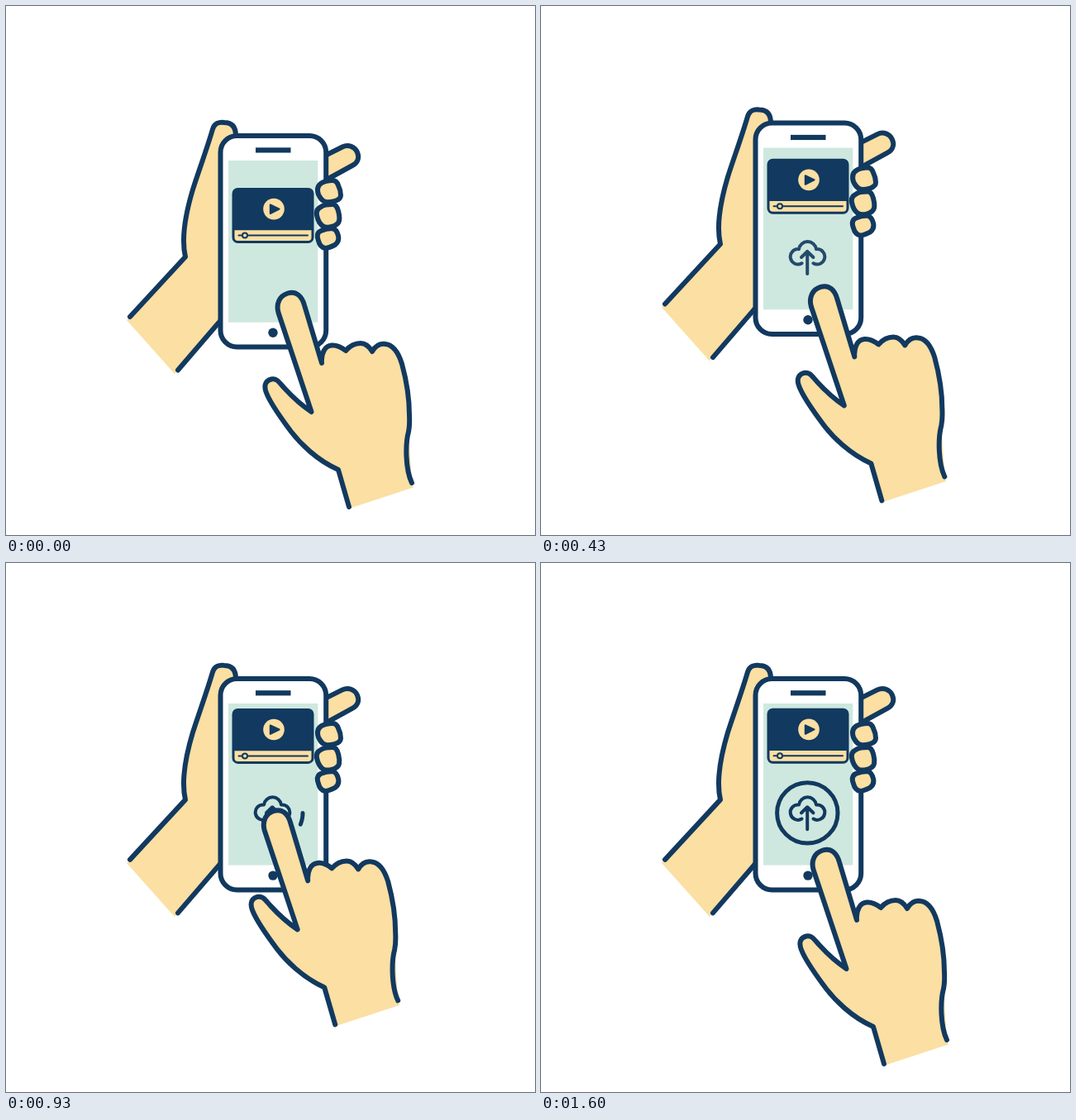
An HTML page that plays this animation: 640 by 640 pixels, repeating every 2400 ms.

```html
<!DOCTYPE html>
<html lang="en">
<head>
<meta charset="utf-8">
<title>Upload from phone</title>
<style>
  html, body { margin: 0; width: 100%; height: 100%; overflow: hidden; background: #fff; }
  svg { display: block; width: 100%; height: 100%; }
  .line { stroke: #12395f; stroke-width: 6; stroke-linecap: round; stroke-linejoin: round; }
  .skin { fill: #fbdfa3; }
  .navy { fill: #12395f; }
  .none { fill: none; }
</style>
</head>
<body>
<svg viewBox="0 0 640 640">
  <g id="phone">
    <path class="skin" d="M146 380 L150 376 L217 303.5 C212 282 217 252 226 222 C233 200 243 173 250 149 C252 142 258 140 264 141 C270 141 278 143 278 157 V380 H260 L208 440.5 L204 445 Z"/>
    <path class="line none" d="M150 376 L217 303.5 C212 282 217 252 226 222 C233 200 243 173 250 149 C252 142 258 140 264 141 C270 141 278 143 278 157 M208 440.5 L260 380"/>
    <path class="line skin" d="M388 180 L407 170.5 C414 167 422 170 425 177 C428 184 425 190 419 193 L388 210"/>
    <rect class="line" x="259.5" y="157" width="127.7" height="255.5" rx="20" fill="#fff"/>
    <rect class="navy" x="302" y="171.3" width="42.5" height="6.2"/>
    <rect x="269" y="187" width="108.3" height="195.7" fill="#cee8df"/>
    <circle class="navy" cx="323" cy="395.2" r="5.7"/>

    <g id="card">
      <rect class="line skin" x="275" y="221.5" width="96" height="64" rx="5.5" style="stroke-width:3"/>
      <path class="navy" d="M274 271.3 V227 Q274 221 280 221 H366 Q372 221 372 227 V271.3 Z"/>
      <circle class="skin" cx="324" cy="245.6" r="12.8"/>
      <path class="line navy" d="M319.8 240.5 L330.6 245.6 L319.8 251 Z" style="stroke-width:2"/>
      <path class="line none" d="M281.5 277.5 H365" style="stroke-width:2"/>
      <circle class="line skin" cx="289" cy="277.5" r="3" style="stroke-width:2"/>
    </g>

    <g id="cloud" class="line none" transform="translate(0 17.1)" style="stroke-width:4">
      <path d="M315.5 309.6 A9.2 9.2 0 1 1 312 292.5 A10.6 10.6 0 0 1 333 292.5 A9.2 9.2 0 1 1 329.5 309.6"/>
      <path d="M322.2 322.3 V296 M315 302.3 L322.2 295.3 L329.4 302.3"/>
    </g>
    <path id="ring" class="line none" transform="translate(0 17.1)" style="stroke-width:5"/>

    <g class="line skin">
      <path d="M382 214 C387 211 391 211 395 211 C399 211 401 214 402 217 C404 221 405 225 405 229 C405 233 401 235 398 236 C394 237 390 238 387 237 C382 236 380 232 378 228 C376 222 377 217 382 214 Z"/>
      <path d="M381 243 C385 240 391 240 395 240 C399 240 401 244 402 248 C403 252 404 255 403 260 C402 264 398 266 394 267 C390 268 386 268 383 266 C379 263 377 258 376 253 C375 248 377 245 381 243 Z"/>
      <path d="M381 272 C385 270 391 269 395 269 C399 270 401 274 402 278 C403 282 402 286 398 289 C394 291 390 293 386 293 C381 292 379 288 378 284 C376 279 376 274 381 272 Z"/>
    </g>
  </g>

  <g id="hand">
    <path class="skin" d="M415 606 L402 561 L487 515 L491 577 L492.7 582.5 L416.5 607.5 Z"/>
    <path class="line skin" d="M415 606 L402 561 C375 549 355 528 345 515 C333 499 320 481 315 468 C311 458 315 453 321 451.5 C328 450 331 456 337 462.5 Q353 480 369.5 491 L329.5 371 C326.5 360 331 350.5 341 347.5 C351 344.5 358 351 361 362 L382 432 C381 420 386 411 394 410.5 C401 410 406 413 411 417 C417 410 423 408 429 408 C436 408 440 413 443 418 C447 411 453 408 459 409 C468 410 475 420 479 433 C485 455 488 480 488 495 C488.5 505 488 510 487 515 C483 530 483 560 491 577"/>
  </g>
</svg>
<script>
  const LOOP = 2400, RISE = 17.1, SLIDE = 27.1;
  const el = id => document.getElementById(id);
  const phone = el('phone'), card = el('card'), cloud = el('cloud'), ring = el('ring'), hand = el('hand');

  const span = (k, from, to) => Math.min(1, Math.max(0, (k - from) / (to - from)));
  const easeOut = x => 1 - (1 - x) ** 4;
  const easeInOut = x => x * x * (3 - 2 * x);
  const move = (node, x, y) => node.setAttribute('transform', `translate(${x} ${y})`);

  // Motion runs at 25 steps per second, shown on a 30 Hz clock.
  function stepAt(ms) {
    const tick = Math.floor((ms + 3.4) * 30 / 1000);
    return Math.min(40, tick - Math.floor((tick + 3) / 6));
  }

  // Arc that grows clockwise from three o'clock.
  function arc(part) {
    if (part <= 0) return '';
    const cx = 322.3, cy = 302.4, r = 36.7;
    const at = a => `${cx + r * Math.cos(a)} ${cy + r * Math.sin(a)}`;
    const end = part * 2 * Math.PI;
    const curve = a => `A${r} ${r} 0 0 1 ${at(a)}`;
    return `M${at(0)}${curve(end / 2)}${curve(end)}${part >= 1 ? 'Z' : ''}`;
  }

  function draw(ms) {
    const k = stepAt(ms % LOOP);
    const lift = easeOut(span(k, 0, 25));
    move(phone, 0, -RISE * lift);
    move(card, 0, -SLIDE * easeOut(span(k, 4, 29)));
    cloud.setAttribute('opacity', lift);
    ring.setAttribute('d', arc(easeInOut(span(k, 20, 40))));
    const tap = span(k, 10, 19) - span(k, 20, 30);
    move(hand, -24 * tap, -68 * tap);
  }

  function loop() {
    draw(performance.now());
    requestAnimationFrame(loop);
  }
  loop();
</script>
</body>
</html>
```
